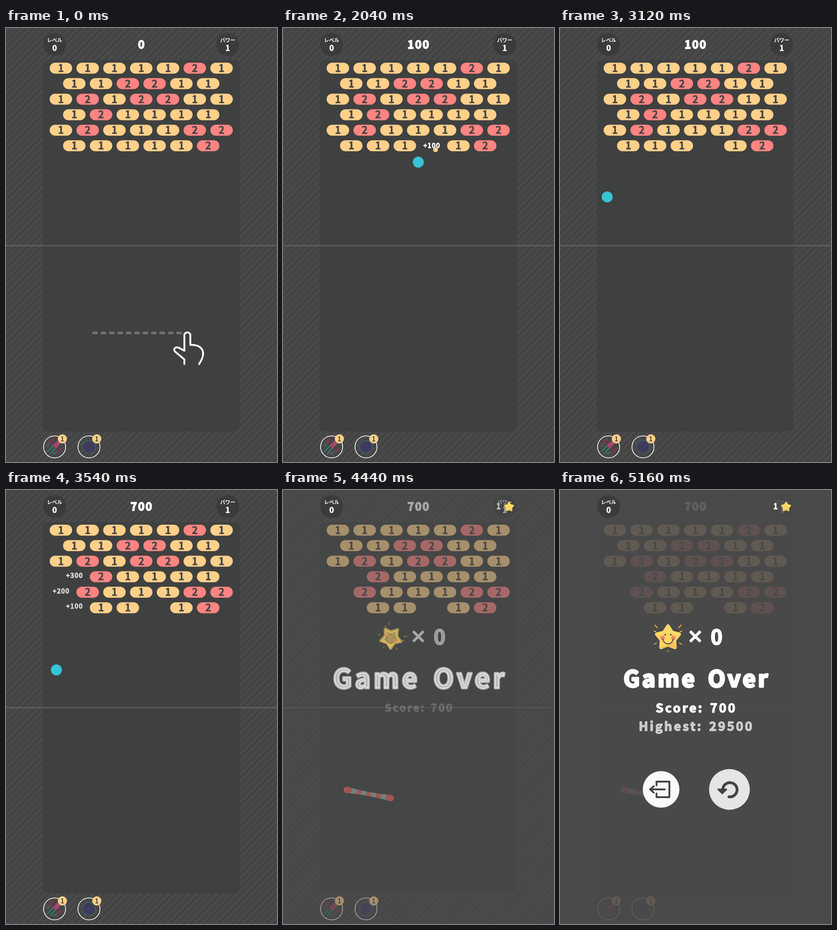
These frames come from a looping animation (591x948 px, 5.64 s). An HTML page with a canvas:

```html
<!DOCTYPE html>
<html lang="ja">
<head>
<meta charset="utf-8">
<style>
  html, body { margin: 0; width: 100%; height: 100%; overflow: hidden; background: #484848; }
  canvas { display: block; }
</style>
</head>
<body>
<canvas id="stage" width="591" height="948"></canvas>
<script>
const ctx = document.getElementById('stage').getContext('2d');
const LOOP = 5640, STEP = 60, TAU = Math.PI * 2;
const YELLOW = '#ffd089', PINK = '#ff8482', INK = '#444444';
const ROWS = ['1111121', '112211', '1212211', '121111', '1211122', '111112'];
const HITS = [
  { at: 2010, row: 5, col: 3, points: 100 },
  { at: 3200, row: 5, col: 0, points: 100 },
  { at: 3225, row: 4, col: 0, points: 200 },
  { at: 3260, row: 3, col: 0, points: 300 },
];
// time, x, y
const BALL = [
  [1260, 295, 500], [1440, 295, 640], [1500, 295, 666], [1560, 295, 645],
  [2010, 301, 280], [2040, 295, 293], [2400, 210, 470], [2760, 126, 676],
  [2790, 122, 677], [2850, 116, 650], [3030, 95, 470], [3200, 110, 279],
  [3225, 111, 250], [3260, 121, 212], [3540, 110, 393], [4080, 110, 858],
];
const ROPES = [
  { a: [213, 634], b: [389, 636], parts: 15, aim: [600, 1020], from: 1200, to: 1860 },
  { a: [303, 624], b: [107, 621], parts: 17, aim: [2220, 2460], from: 2520, to: 3090 },
  { a: [139, 655], b: [235, 673], parts: 9, aim: [3660, 3900], from: 3960, to: LOOP },
];

const clamp = v => Math.max(0, Math.min(1, v));
const ramp = (t, start, length) => clamp((t - start) / length);
const mix = (a, b, k) => a + (b - a) * k;
const mixPoint = (a, b, k) => [mix(a[0], b[0], k), mix(a[1], b[1], k)];
const backOut = p => 1 + 2.7 * (p - 1) ** 3 + 1.7 * (p - 1) ** 2;

function disc(x, y, r, color) {
  ctx.fillStyle = color;
  ctx.beginPath();
  ctx.arc(x, y, r, 0, TAU);
  ctx.fill();
}

function pill(x, y, w, h, r, color) {
  ctx.fillStyle = color;
  ctx.beginPath();
  ctx.roundRect(x, y, w, h, r);
  ctx.fill();
}

function stroke(path, color, width, cap = 'round') {
  ctx.strokeStyle = color;
  ctx.lineWidth = width;
  ctx.lineCap = cap;
  ctx.lineJoin = 'round';
  ctx.stroke(new Path2D(path));
}

// Centred text; "fat" rounds and thickens the letters.
function label(text, x, y, size, { color = '#fff', fat = 0, gap = 0, word = 0 } = {}) {
  ctx.font = `bold ${size}px "Noto Sans CJK JP", "Noto Sans CJK", "Noto Sans", sans-serif`;
  ctx.letterSpacing = gap + 'px';
  ctx.wordSpacing = word + 'px';
  ctx.textAlign = 'center';
  ctx.textBaseline = 'alphabetic';
  ctx.fillStyle = ctx.strokeStyle = color;
  ctx.lineWidth = fat;
  ctx.lineJoin = 'round';
  const baseline = y + size * 0.365;
  ctx.fillText(text, x + gap / 2, baseline);
  if (fat) ctx.strokeText(text, x + gap / 2, baseline);
}

function group(x, y, scale, alpha, draw, turn = 0) {
  if (alpha <= 0 || scale <= 0) return;
  ctx.save();
  ctx.translate(x, y);
  ctx.rotate(turn);
  ctx.scale(scale, scale);
  ctx.globalAlpha *= alpha;
  draw();
  ctx.restore();
}

function ballAt(t) {
  const i = BALL.findIndex(key => key[0] > t);
  if (i === 0 || t > 4080) return null;
  if (i < 0) return BALL.at(-1).slice(1);
  const [p, q] = [BALL[i - 1], BALL[i]];
  return mixPoint(p.slice(1), q.slice(1), (t - p[0]) / (q[0] - p[0]));
}

const blockCenter = (row, col) => [119.7 + (row % 2) * 29.2 + col * 58.4, 87.7 + row * 33.9];

function background() {
  ctx.fillStyle = '#494949';
  ctx.fillRect(0, 0, 591, 948);
  let lines = '';
  for (let x = 0; x < 1540; x += 15) lines += `M${x} 0L${x - 948} 948`;
  stroke(lines, '#414141', 3, 'butt');
  pill(80, 70, 430, 811, 10, '#3f4040');
}

function badge(x, title, value) {
  disc(x, 36, 25, '#3b3b3b');
  label(title, x, 27, 11);
  label(value, x, 44, 17, { fat: 0.5 });
}

function blocks(t) {
  ROWS.forEach((cells, row) => [...cells].forEach((value, col) => {
    if (HITS.some(h => h.row === row && h.col === col && t >= h.at)) return;
    const [x, y] = blockCenter(row, col);
    pill(x - 24.5, y - 12, 49, 24, 12, value === '1' ? YELLOW : PINK);
    label(value, x, y, 22, { color: INK, fat: 0.5 });
  }));
}

function bursts(t) {
  for (const hit of HITS) {
    const age = t - hit.at;
    if (age < 0 || age > 900) continue;
    const [x, y] = blockCenter(hit.row, hit.col);
    ctx.globalAlpha = clamp(1.02 - age / 1080);
    label('+' + hit.points, x, y - age * 0.0088, 14, { fat: 0.8, gap: 1 });
    ctx.globalAlpha = 1;
    const fall = 0.2 * age + 0.003 * age * age;
    if (age < 210) disc(x + 7 + age * 0.05, y + fall, 6 * (1 - age / 240), YELLOW);
  }
}

function dashes(a, b) {
  const length = Math.hypot(b[0] - a[0], b[1] - a[1]);
  const [dx, dy] = [(b[0] - a[0]) / length, (b[1] - a[1]) / length];
  let path = '';
  for (let s = 3; s + 6 < length; s += 18.3) {
    path += `M${a[0] + dx * s} ${a[1] + dy * s}l${dx * 6.5} ${dy * 6.5}`;
  }
  if (path) stroke(path, '#6f6f6f', 6);
}

// Point where the ball pushes the rope to, or null when it is clear of it.
function bendPoint(a, b, ball) {
  if (!ball) return null;
  const k = (ball[0] - a[0]) / (b[0] - a[0]);
  if (k < 0 || k > 1 || ball[1] < mix(a[1], b[1], k) - 15) return null;
  const unit = p => {
    const d = Math.hypot(p[0] - ball[0], p[1] - ball[1]);
    return [(p[0] - ball[0]) / d, (p[1] - ball[1]) / d];
  };
  const u = unit(a), v = unit(b);
  const sum = [u[0] + v[0], u[1] + v[1]];
  const size = Math.hypot(...sum);
  if (sum[1] > -0.02) return [ball[0], ball[1] + 18];
  const reach = 18.5 / Math.sqrt(1 - size * size / 4);
  return [ball[0] - sum[0] / size * reach, ball[1] - sum[1] / size * reach];
}

function rope({ a, b, parts }, ball) {
  const bend = bendPoint(a, b, ball);
  const mid = bend || mixPoint(a, b, 0.5);
  const first = Math.hypot(mid[0] - a[0], mid[1] - a[1]);
  const total = first + Math.hypot(b[0] - mid[0], b[1] - mid[1]);
  const split = first / total;
  const raw = u => u < split ? mixPoint(a, mid, u / split) : mixPoint(mid, b, (u - split) / (1 - split));
  const at = u => {
    const r = Math.min(18 / total, u, 1 - u);
    const points = [-1, -0.5, 0, 0.5, 1].map(k => raw(u + k * r));
    return [0, 1].map(axis => points.reduce((s, p) => s + p[axis], 0) / 5);
  };
  const pieces = parts * 4;
  [a, b].forEach(p => disc(...p, 7, '#f4625f'));
  for (let i = 0; i < pieces; i++) {
    const u = (i + 0.5) / pieces;
    const p = at(i / pieces), q = at(Math.min(1, (i + 1.15) / pieces));
    const width = bend ? 13.5 : 9 + 5 * (2 * u - 1) ** 2;
    stroke(`M${p}L${q}`, (i >> 2) % 2 ? '#8dbcae' : '#f4625f', width, 'butt');
  }
}

function ropes(t, ball) {
  ROPES.forEach((r, i) => {
    if (t >= r.aim[0] && t < r.from) {
      const overshoot = i === 2 ? 1.3 : 1;
      dashes(r.a, mixPoint(r.a, r.b, overshoot * ramp(t, r.aim[0], r.aim[1] - r.aim[0])));
    } else if (t >= r.from && t < r.to) rope(r, ball);
  });
}

function hint() {
  dashes([188, 666], [389, 666]);
  stroke('M389 734V724L369 707C364 701 369 696 376 698L389 705V671' +
    'C389 663 402 663 402 671V692C433 692 436 712 421 734', '#fff', 4);
}

function skills() {
  stroke('M91 925L108 908M97 929L112 912M90 914L99 904M103 931L119 920', '#2f8580', 2);
  stroke('M104 913L116 902M108 916L118 905', '#b5446e', 4);
  stroke('M94 907L102 899M113 925L121 919', '#74394f', 5);
  disc(181, 915, 13, '#403b5d');
  ctx.setLineDash([2, 2]);
  stroke('M195 915a14 14 0 1 0 -28 0a14 14 0 1 0 28 0', '#2f8f95', 1);
  ctx.setLineDash([]);
  for (const x of [106, 181]) {
    stroke(`M${x + 24} 915a24 24 0 1 0 -48 0a24 24 0 1 0 48 0`, '#fff', 1.6);
    disc(x + 17, 897.5, 10, YELLOW);
    label('1', x + 17, 897.5, 14, { color: INK });
  }
}

function starShape(r) {
  let path = '';
  for (let i = 0; i < 10; i++) {
    const angle = i * TAU / 10 - TAU / 4, d = i % 2 ? r * 0.58 : r;
    path += (i ? 'L' : 'M') + d * Math.cos(angle) + ' ' + d * Math.sin(angle);
  }
  return path + 'Z';
}

function star(r) {
  ctx.fillStyle = '#fdd868';
  ctx.fill(new Path2D(starShape(r)));
  stroke(starShape(r), '#fdd868', r * 0.28);
  stroke(`M${-r * 0.5} ${r * 0.78}Q${r * 0.1} ${r * 0.72} ${r * 0.5} ${r * 0.42}L${r * 0.58} ${r * 0.8}L0 ${r * 0.6}`, '#f2bd55', r * 0.14);
}

function smilingStar() {
  stroke('M-23 -22l-6 -6M-26 -13l-4 -2M23 -22l6 -6M26 -13l4 -2M-25 11l-5 3M25 11l5 3M0 28v2', '#e9ad4c', 2);
  star(26);
  disc(-12, 0, 5, '#f58a5e');
  disc(12, 0, 5, '#f58a5e');
  disc(-6, -7, 2, '#6a5a44');
  disc(6, -7, 2, '#6a5a44');
  stroke('M-11 2A11 11 0 0 0 11 2', '#6e6252', 2.5);
}

function exitButton() {
  disc(0, 0, 40, '#fafafa');
  stroke('M-10 -9V-17H18V17H-10V9M8 0H-23M-16 -7L-24 0L-16 7', INK, 4);
}

function retryButton(pressed) {
  disc(0, 0, 40, pressed > 0 ? '#e5e5e5' : '#fafafa');
  stroke('M-1 14.5A14 14 0 1 0 -13 0', INK, 5.5);
  stroke('M-22 0H-6L-14 8Z', INK, 3);
  ctx.fillStyle = INK;
  ctx.fill(new Path2D('M-22 0H-6L-14 8Z'));
}

function gameOver(t) {
  ctx.globalAlpha = 0.88 * ramp(t, 4170, 480);
  ctx.fillStyle = '#4b4b4b';
  ctx.fillRect(0, 0, 591, 948);
  ctx.globalAlpha = 1;

  const coin = ramp(t, 4200, 240);
  group(493, 37, 1, coin, () => star(10));
  group(470, 36, 1, ramp(t, 4260, 300), () => label('1', 0, 0, 17, { fat: 0.8 }));

  const spin = ramp(t, 4260, 640);
  group(235.5, 323, backOut(spin) * 0.95 + 0.05, ramp(t, 4260, 340), smilingStar, (1 - spin) ** 2 * 1.3);
  group(295, 321, 1, ramp(t, 4320, 300), () => {
    label('×', 0, 0, 36, { fat: 2.5 });
    label('0', 46.5, 0, 43, { fat: 2.5 });
  });

  const title = ramp(t, 4260, 300);
  group(296, 412, 1.475 - 0.475 * title, title, () =>
    label('Game Over', 0, 0, 49, { fat: 4, gap: 5, word: 8 }));

  const small = { fat: 1.6, gap: 3.6, word: 4 };
  const score = ramp(t, 4395, 300);
  group(295.5, 476, 0.82 + 0.18 * score, score, () => label('Score: 700', 0, 0, 27, small));
  const best = ramp(t, 4650, 300);
  group(295.5, 516, 0.82 + 0.18 * best, best * 0.65, () => label('Highest: 29500', 0, 0, 27, small));

  const pop = ramp(t, 4770, 210), press = ramp(t, 4980, 180);
  group(220.5, 654, pop, pop, exitButton);
  group(369.5, 654, pop * (1 + 0.112 * press), pop, () => retryButton(press));
}

function draw(t) {
  const ball = ballAt(t);
  const score = HITS.reduce((sum, h) => sum + (t >= h.at ? h.points : 0), 0);
  ctx.globalAlpha = 1;
  background();
  badge(483.5, 'パワー', '1');
  label(String(score), 295, 36, 24, { fat: 1.8, gap: 2.2 });
  blocks(t);
  ctx.fillStyle = '#696969';
  ctx.fillRect(0, 474.5, 591, 2);
  if (t < 540) hint();
  ropes(t, ball);
  bursts(t);
  if (ball) disc(...ball, 12, '#36c4d6');
  skills();
  if (t >= 4200) gameOver(t);
  badge(106, 'レベル', '0');
}

const start = performance.now();
function tick() {
  const t = (performance.now() - start) % LOOP;
  draw(Math.floor(t / STEP) * STEP);
  requestAnimationFrame(tick);
}
tick();
</script>
</body>
</html>
```
